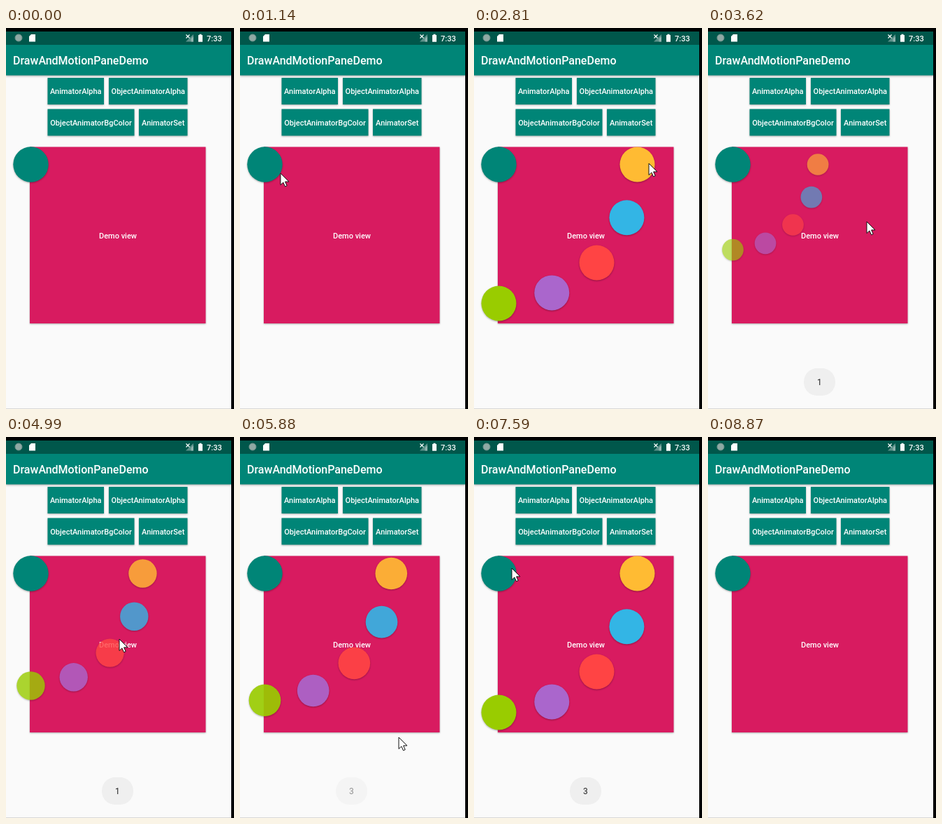
Write an HTML page that moves like this. It is 326 px wide and 543 px high and loops after 9300 ms.

```html
<!DOCTYPE html>
<html lang="en">
<head>
<meta charset="utf-8">
<title>Radial menu</title>
<style>
  html, body { margin: 0; width: 100%; height: 100%; overflow: hidden; background: #000; }
  svg { display: block; width: 326px; height: 543px; }
  text { font: 500 11px Roboto, sans-serif; fill: #fff; }
  .mid { text-anchor: middle; }
  .title { font-size: 16px; }
  .raised { filter: drop-shadow(0 1px 1px rgba(0, 0, 0, .32)); }
  .bar { filter: drop-shadow(0 1px 1.5px rgba(0, 0, 0, .35)); }
  #toast text { font-weight: 400; font-size: 12px; fill: #222; }
</style>
</head>
<body>
<svg viewBox="0 0 326 543" xmlns="http://www.w3.org/2000/svg">
  <rect width="326" height="543" fill="#000"/>
  <rect y="5" width="322" height="537" fill="#fafafa"/>
  <rect y="542" width="322" height="1" fill="#d8d8d8"/>
  <rect class="bar" y="24" width="322" height="43.5" fill="#008577"/>
  <rect y="5" width="322" height="19" fill="#00574b"/>

  <circle cx="18" cy="14" r="5" fill="#8fa9a4" stroke="#6d918a"/>
  <path d="M36 9h6v10.500h-9v-7.500z" fill="#fff"/>
  <path d="M268 9v10.500h-11z" fill="#5c918a"/>
  <path d="M268 12v7.500h-3.500v-4z" fill="#8fb3ae"/>
  <path d="M257.500 9.500l5 5m0-5l-5 5" stroke="#fff" stroke-width="1.200"/>
  <path d="M275 10h1.500v-1.200h3v1.200h1.500v9.700h-6z" fill="#fff"/>
  <text x="287" y="18.500">7:33</text>
  <text class="title" x="10" y="52">DrawAndMotionPaneDemo</text>

  <g id="buttons"></g>
  <rect class="raised" x="34" y="169.500" width="251.500" height="251.500" fill="#d81b60"/>
  <text class="mid" x="160" y="299.500">Demo view</text>

  <g id="items"></g>
  <circle class="raised" cx="35.500" cy="194.500" r="25.200" fill="#008577"/>

  <g id="toast" opacity="0">
    <rect x="137" y="485" width="45" height="39" rx="19" fill="#efefef"/>
    <text class="mid" x="159.300" y="509">1</text>
  </g>
  <path id="cursor" d="M0 0V16.500L3.900 12.900L6.500 18.800L9.200 17.600L6.600 11.900H12Z"
        fill="#fff" stroke="#111" stroke-width="1" stroke-linejoin="round"/>
</svg>
<script>
const LOOP = 9300;
const HUB = { x: 35.5, y: 194.5 }, REACH = 198, RADIUS = 25;
const COLORS = ['#ffbb33', '#33b5e5', '#ff4444', '#aa66cc', '#99cc00'];

const buttons = [
  ['AnimatorAlpha', 59.5, 71, 80.5], ['ObjectAnimatorAlpha', 147, 71, 112.5],
  ['ObjectAnimatorBgColor', 59.5, 115.5, 124], ['AnimatorSet', 190, 115.5, 69.5]
];
// start, duration, opening?
const moves = [
  [1278, 1246, true], [3301, 750, false],
  [4102, 1250, true], [5738, 750, false],
  [6395, 1200, true], [8274, 750, false]
];
// label, start of fade in, start of fade out
const toasts = [['1', 3330, 5330], ['3', 5765, 7660]];
const FADE = 240;
// time, x, y
const path = [
  [620, 263, 389], [1250, 42, 193], [1580, 42, 193], [2030, 80, 268],
  [2780, 250, 193], [3290, 250, 193], [3620, 227, 276], [3920, 130, 240],
  [4090, 30, 195], [4350, 30, 195], [4990, 162, 288], [5400, 172, 328],
  [5690, 172, 328], [5880, 227, 428], [6380, 54, 187], [8270, 54, 187],
  [8640, 291, 532]
];
const HIDE = 8700;

const $ = id => document.getElementById(id);
const clamp = v => Math.max(0, Math.min(1, v));
const ease = v => (1 - Math.cos(Math.PI * clamp(v))) / 2;

function add(parent, tag, attrs, text = '') {
  const el = document.createElementNS('http://www.w3.org/2000/svg', tag);
  for (const k in attrs) el.setAttribute(k, attrs[k]);
  el.textContent = text;
  return parent.appendChild(el);
}

for (const [label, x, y, width] of buttons) {
  add($('buttons'), 'rect', { class: 'raised', x, y, width, height: 38, fill: '#008577' });
  add($('buttons'), 'text', { class: 'mid', x: x + width / 2, y: y + 23 }, label);
}

const items = COLORS.map(fill => add($('items'), 'circle', { class: 'raised', fill }));
const toastText = $('toast').querySelector('text');

function openness(t) {
  let p = 0;
  for (const [start, span, opening] of moves) {
    if (t < start) break;
    const e = ease((t - start) / span);
    p = opening ? e : 1 - e;
  }
  return p;
}

function drawMenu(p) {
  items.forEach((el, i) => {
    const a = i * Math.PI / 8;
    el.setAttribute('cx', HUB.x + REACH * p * Math.cos(a));
    el.setAttribute('cy', HUB.y + REACH * p * Math.sin(a));
    el.setAttribute('r', RADIUS * p);
    el.setAttribute('opacity', p);
  });
}

function drawToast(t) {
  let alpha = 0;
  for (const [label, from, to] of toasts) {
    if (t < from || t > to + FADE) continue;
    alpha = Math.min(clamp((t - from) / FADE), 1 - clamp((t - to) / FADE));
    toastText.textContent = label;
  }
  $('toast').setAttribute('opacity', alpha);
}

function drawCursor(t) {
  const shown = t >= path[0][0] && t < HIDE;
  $('cursor').setAttribute('visibility', shown ? 'visible' : 'hidden');
  if (!shown) return;
  const n = path.findIndex(k => k[0] > t);
  const b = path[n < 0 ? path.length - 1 : n];
  const a = n < 0 ? b : path[n - 1];
  const k = n < 0 ? 0 : ease((t - a[0]) / (b[0] - a[0]));
  const x = a[1] + (b[1] - a[1]) * k, y = a[2] + (b[2] - a[2]) * k;
  $('cursor').setAttribute('transform', `translate(${x} ${y})`);
}

function render(t) {
  drawMenu(openness(t));
  drawToast(t);
  drawCursor(t);
}

const began = performance.now();
function tick() {
  render((performance.now() - began) % LOOP);
  requestAnimationFrame(tick);
}
tick();
</script>
</body>
</html>
```
